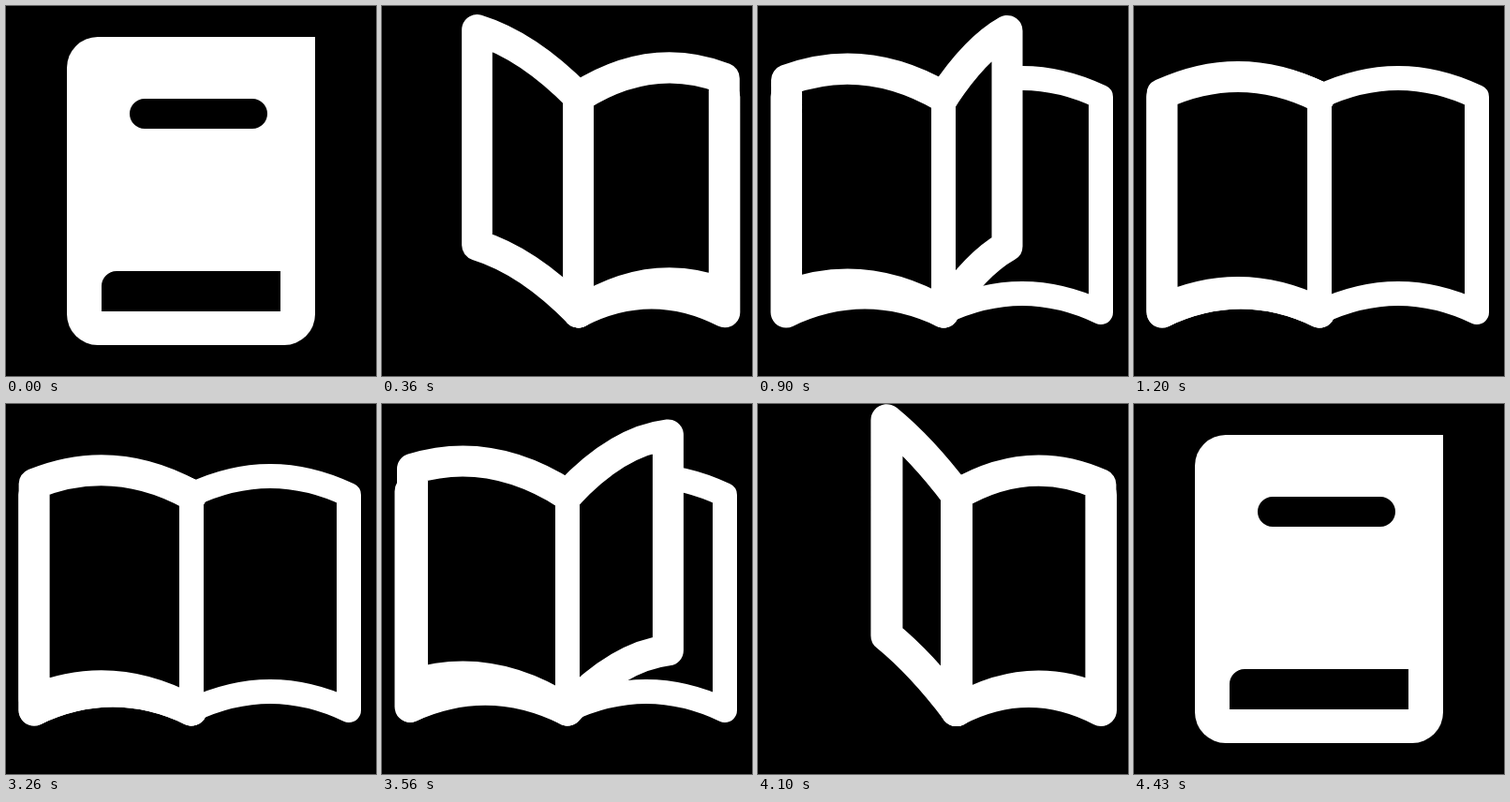
Recreate the animation shown at these times as an HTML page with a canvas. Size 395 by 395 pixels, loop 5460 ms.

```html
<!DOCTYPE html>
<html lang="en">
<head>
<meta charset="utf-8">
<title>Opening book</title>
<style>
  html, body { margin: 0; width: 100%; height: 100%; overflow: hidden; background: #000; }
  canvas { display: block; width: 100vmin; height: 100vmin; }
</style>
</head>
<body>
<canvas id="stage" width="395" height="395"></canvas>
<script>
const ctx = document.getElementById('stage').getContext('2d');
const LOOP = 5460, STEP = 30, LAST = 40;
const CLOSE_AT = 3260, CLOSED_AT = 4430;
const WHITE = '#fff', BLACK = '#000';

// Start and duration in steps for the cover and the three pages
const cover = { start: 0, span: 18.7, rise: 86 };
const pages = [
  { start: 9.54, span: 20, rise: 74.2 },
  { start: 13.4, span: 18.7, rise: 74.2 },
  { start: 22.2, span: 18.2, rise: 74.2 }
];

const clamp = v => Math.max(0, Math.min(1, v));
const mix = (a, b, k) => a + (b - a) * k;
const easeInOut = k => k < .5 ? 2 * k * k : 1 - 2 * (1 - k) ** 2;

// Geometry of the book block: it slides and shrinks, then widens
function bookAt(s) {
  const a = clamp(s / 11), b = clamp((s - 11) / 6);
  return {
    x: mix(mix(82, 212, a), 198, b),
    right: mix(313, 366, a),
    top: mix(50, 97, a),
    bottom: mix(345, 327, a),
    coverBottom: mix(266, 327, a),
    bow: 20 * a,
    width: mix(34, 26, b)
  };
}

function leafAt(leaf, s, book) {
  const angle = Math.PI * easeInOut(clamp((s - leaf.start) / leaf.span));
  const c = Math.cos(angle);
  return {
    side: c,
    dx: (book.right - book.x) * c,
    lift: leaf.rise * Math.max(0, Math.sin(angle)) ** .56,
    bow: book.bow * Math.abs(c)
  };
}

// Sheet hinged on the spine with bowed top and bottom edges
function sheet(book, leaf, bottom) {
  const { x, top } = book, { dx, lift, bow } = leaf;
  const midX = x + dx / 2, sag = lift / 2 + 2 * bow;
  const path = new Path2D();
  path.moveTo(x, top);
  path.quadraticCurveTo(midX, top - sag, x + dx, top - lift);
  path.lineTo(x + dx, bottom - lift);
  path.quadraticCurveTo(midX, bottom - sag, x, bottom);
  return path;
}

function paint(path, fill, width) {
  ctx.fillStyle = fill;
  ctx.fill(path);
  ctx.lineWidth = width;
  ctx.stroke(path);
}

function drawSpine(book, bottom) {
  ctx.lineWidth = book.width;
  ctx.beginPath();
  ctx.moveTo(book.x, book.top);
  ctx.lineTo(book.x, bottom);
  ctx.stroke();
}

// The title slot grows until it fills the inside of the cover
function drawCover(book, s) {
  const leaf = leafAt(cover, s, book);
  leaf.bow *= Math.abs(leaf.side);
  const path = sheet(book, leaf, book.coverBottom);
  const k = clamp(s / 9);
  if (k === 1) {
    paint(path, BLACK, book.width);
  } else {
    paint(path, WHITE, book.width);
    const u0 = mix(.216, 0, k), u1 = mix(.853, 1, k);
    const v0 = mix(.227, 0, k), v1 = mix(.375, 1, k);
    const put = (u, v) => ctx.lineTo(
      book.x + leaf.dx * u,
      mix(book.top, book.coverBottom, v) - leaf.lift * u - 4 * leaf.bow * u * (1 - u)
    );
    ctx.beginPath();
    put(u0, v0); put(u1, v0); put(u1, v1); put(u0, v1);
    ctx.fillStyle = BLACK;
    ctx.fill();
    ctx.lineWidth = book.width;
    ctx.stroke(path);
  }
  drawSpine(book, book.coverBottom);
}

function drawClosed() {
  ctx.fillStyle = WHITE;
  ctx.beginPath();
  ctx.roundRect(65, 33, 265, 329, [33, 0, 33, 33]);
  ctx.fill();
  ctx.fillStyle = BLACK;
  ctx.beginPath();
  ctx.roundRect(132, 99, 147, 32, 16);
  ctx.roundRect(102, 283, 191, 43, [16, 0, 0, 0]);
  ctx.fill();
}

function draw(s) {
  ctx.fillStyle = BLACK;
  ctx.fillRect(0, 0, 395, 395);
  if (s === 0) return drawClosed();

  ctx.strokeStyle = WHITE;
  ctx.lineCap = ctx.lineJoin = 'round';
  const book = bookAt(s);
  const block = { dx: book.right - book.x, lift: 0, bow: book.bow };
  paint(sheet(book, block, book.bottom), BLACK, book.width);
  drawSpine(book, book.bottom);

  const turning = pages.filter(p => s > p.start).map(p => leafAt(p, s, book));
  const drawPage = leaf => paint(sheet(book, leaf, book.bottom), BLACK, 33);
  turning.filter(p => p.side > 0).reverse().forEach(drawPage);
  drawCover(book, s);
  turning.filter(p => p.side <= 0).forEach(drawPage);
  drawSpine(book, book.bottom);
}

function stepAt(t) {
  if (t < CLOSE_AT) return Math.min(LAST, Math.floor(t / STEP + 1e-6));
  return Math.max(0, Math.ceil((CLOSED_AT - t) / STEP - 1e-6));
}

const began = performance.now();
function tick() {
  draw(stepAt((performance.now() - began) % LOOP));
  requestAnimationFrame(tick);
}
tick();
</script>
</body>
</html>
```
